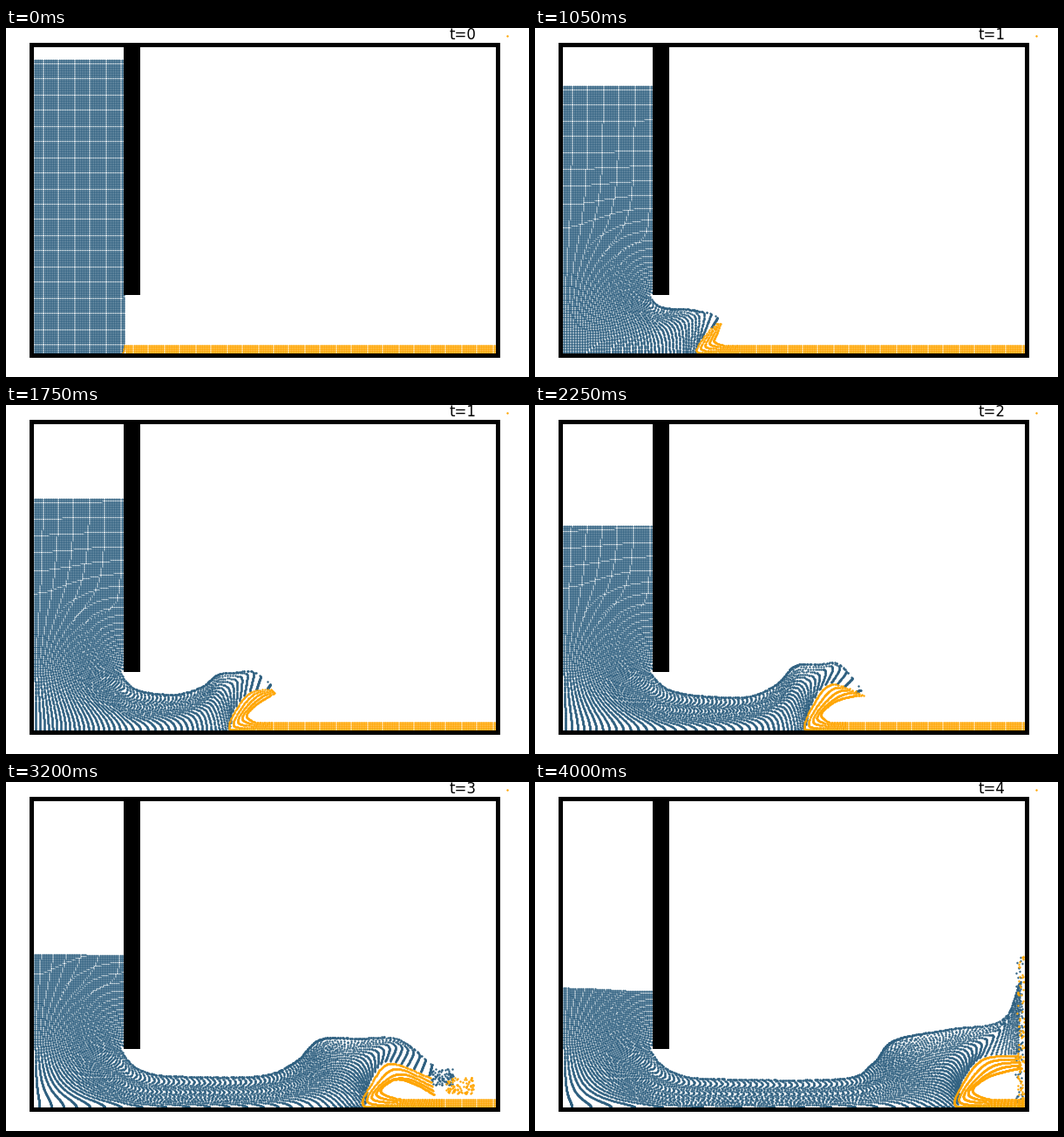
These frames come from a looping animation (600x400 px, 4.05 s). A matplotlib script:

```python
import numpy as np
import matplotlib.pyplot as plt
from matplotlib.animation import FuncAnimation
from matplotlib.patches import Rectangle

FRAMES, MS = 81, 50
LEFT, RIGHT, TOP, FLOOR = 32, 562, 22, 373
W, GAP = 103, 67            # reservoir width, gate opening
LIP = 4                     # the outflow starts this far before the gate
EXIT = LEFT + W - LIP
GATE = FLOOR - GAP
STEP = 2.118                # particle spacing
BED = 11                    # depth of the orange layer
BLUE, ORANGE = "#2f6080", "#ffa500"


def spline(q, x, y, rest=False):
    """Smooth curve through y(x); with rest it starts at zero speed."""
    q = np.asarray(q, float)
    x, y = np.asarray(x, float), np.asarray(y, float)
    m = np.gradient(y, x, axis=0)
    if rest:
        m[0] = 0
    i = np.clip(np.searchsorted(x, q, side="right") - 1, 0, len(x) - 2)
    col = (len(q),) + (1,) * (y.ndim - 1)
    h = (x[i + 1] - x[i]).reshape(col)
    p = ((q - x[i]) / (x[i + 1] - x[i])).reshape(col)
    return ((1 + 2 * p) * (1 - p) ** 2 * y[i] + p * (1 - p) ** 2 * h * m[i]
            + p * p * (3 - 2 * p) * y[i + 1] + p * p * (p - 1) * h * m[i + 1])


times = np.arange(FRAMES) * MS / 1000


def track(*values):
    return spline(times, (0, 0.7, 1.05, 1.75, 2.25, 3.2, 3.65, 4), values, True)


volume = W * track(0, 14, 30, 71, 102, 161, 184.5, 201)
reach = track(139, 205, 235, 305, 356, 500, 558, 561)    # end of moved bed
foot = track(133.7, 156, 184, 254, 307, 408, 451, 480)
tip_x = track(135, 171, 212, 308, 380, 490, 546, 557)
tip_y = track(306, 348, 335, 324, 335, 325, 318, 228)
dip_x = track(132.3, 146, 158, 175, 200, 190, 196, 200)
dip_y = track(306, 318, 322, 331, 334, 337, 339, 340)
flat_x = track(132.8, 150, 170, 200, 245, 290, 324, 350)
back_x = track(133.7, 157, 190, 243, 298, 360, 390, 412)
back_y = track(306, 325, 325, 309, 299, 295, 296, 296)
brow_x = track(134.6, 165, 207, 284, 350, 450, 498, 535)
brow_y = track(306, 344, 330, 306, 298, 295, 285, 273)
rise = track(0, 18, 25, 44, 54, 53, 55, 57)              # height of the arch
edge_y = track(373, 348, 337, 325, 332, 337, 330, 312)
curl_y = track(362, 348, 338, 330, 333, 362, 362, 330)


def mix(a, b, f):
    return a + (b - a) * f


def outlines(k):
    """Water surface, blue/orange interface and air side of the curl."""
    d = dip_y[k]
    surface = np.array([
        (EXIT, GATE),
        (mix(EXIT, dip_x[k], 0.18), mix(GATE, d, 0.5)),
        (mix(EXIT, dip_x[k], 0.46), mix(GATE, d, 0.83)),
        (dip_x[k], d),
        (flat_x[k], d),
        (mix(flat_x[k], back_x[k], 0.6), mix(d, back_y[k], 0.4)),
        (back_x[k], back_y[k]),
        (mix(back_x[k], brow_x[k], 0.5), mix(back_y[k], brow_y[k], 0.5) - 1),
        (brow_x[k], brow_y[k]),
        (tip_x[k], tip_y[k])])
    r = rise[k]
    edge = np.array([
        (foot[k], FLOOR),
        (foot[k] + 0.15 * r, FLOOR - 0.5 * r),
        (foot[k] + 0.55 * r, FLOOR - r),
        (tip_x[k] - 3 * min(1, r / 18), edge_y[k])])
    end = min(reach[k], RIGHT - 1)
    x = foot[k] + min((end - foot[k]) / 2, 25)
    y = FLOOR - BED - 0.2 * r
    roof = y - 0.22 * r
    lip = tip_x[k] + min(2, r / 9)
    curl = np.array([
        (lip, curl_y[k]),
        (mix(x, lip, 0.72), mix(roof, curl_y[k], 0.5)),
        (mix(x, lip, 0.32), roof),
        (x, y),
        (mix(x, end, 0.3), FLOOR - BED),
        (end, FLOOR - BED)])
    return surface, edge, curl, end


def ribbon(lo, hi, along, across, n=200):
    """Place particles between two curves, evenly by area along them."""
    i, c = np.arange(n), np.arange(len(lo))
    u = np.linspace(0, len(lo) - 1, n)
    lo, hi = spline(u, c, lo), spline(u, c, hi)
    d, e = hi[1:] - lo[:-1], hi[:-1] - lo[1:]
    area = 0.5 * np.abs(d[:, 0] * e[:, 1] - d[:, 1] * e[:, 0]) + 1e-6
    total = np.append(0, np.cumsum(area))
    pos = np.interp(along * total[-1], total, i)
    return np.column_stack([
        mix(np.interp(pos, i, lo[:, j]), np.interp(pos, i, hi[:, j]), across)
        for j in (0, 1)])


SINKS = -np.cosh(np.pi * (np.arange(20) + 0.5) / 20 * GAP / W)


def pull(z):
    """Potential flow in the reservoir towards the gate, per unit of volume."""
    zeta = np.cos(np.pi * z / W)
    total = (1 / (zeta[:, None] - SINKS)).sum(axis=1)
    return np.conj(np.sin(np.pi * z / W) * total) / (W * len(SINKS))


def keep_in(z):
    return np.clip(z.real, 0.3, W - 0.3) + 1j * np.maximum(z.imag, 0.3)


def grid(x, y):
    a, b = np.meshgrid(x, y)
    return a.ravel(), b.ravel()


def spray(k, offsets, shift, limit, mid, drift, size, wide):
    """Droplets thrown ahead of the tip, then up the right wall."""
    g = (times[k] - 2.7) / 1.3
    if g < 0:
        return np.empty((0, 2))
    x = min(tip_x[k] + shift, limit) + offsets[:, 0] * (4 + wide * (1 - g))
    y = mid + drift * g ** 3 + offsets[:, 1] * (5 + size * g ** 3)
    return np.column_stack([np.clip(x, LEFT, RIGHT - 1), y])


def simulate():
    rng = np.random.default_rng(4)
    drops_b, drops_o = rng.uniform(-1, 1, (2, 90, 2))

    gx, gy = grid(np.arange(1, W, STEP), np.arange(1, 337, STEP))
    z = gx + 1j * gy
    inside = np.ones(len(z), bool)
    left_at, level = np.zeros(len(z)), np.zeros(len(z))
    bx, by = grid(np.arange(136, RIGHT, STEP), 1 + STEP * np.arange(5))

    def release(v):
        go = inside & (z.real > W - LIP) & (z.imag < GAP + 1)
        left_at[go] = v - (z.real[go] - (W - LIP)) * GAP
        level[go] = np.clip(z.imag[go] / GAP, 0, 1)
        inside[go] = False

    release(0)
    frames, sub = [], 4
    for k in range(FRAMES):
        if k:
            dv = (volume[k] - volume[k - 1]) / sub
            for j in range(sub):
                p = z[inside]
                half = keep_in(p + pull(p) * dv / 2)
                z[inside] = keep_in(p + pull(half) * dv)
                release(volume[k - 1] + (j + 1) * dv)

        surface, edge, curl, end = outlines(k)
        floor_x = np.append(surface[:5, 0], (flat_x[k] + foot[k]) / 2)
        bottom = np.vstack([np.c_[floor_x, np.full(6, FLOOR)], edge])
        out = ~inside
        along = (volume[k] - left_at[out]) / (volume[k] + LIP * GAP)
        blue = np.vstack([
            np.c_[LEFT + z.real[inside], FLOOR - z.imag[inside]],
            ribbon(bottom, surface, along, level[out]),
            spray(k, drops_b, 10, 555, tip_y[k] + 10, 45, 85, 14)])

        moved = bx < end
        outer = np.vstack([edge[::-1], [((foot[k] + end) / 2, FLOOR),
                                        (end, FLOOR)]])
        along = 1 - (end - bx[moved]) / (end - 135)
        orange = np.vstack([
            np.c_[bx[~moved], FLOOR - by[~moved]],
            ribbon(outer, curl, along, by[moved] / BED),
            spray(k, drops_o, 30, 557, 352, -67, 80, 20),
            [(574.5, 8.5)]])
        for p in (blue, orange):
            p[:, 1] = np.minimum(p[:, 1], FLOOR - 1)
        frames.append((blue, orange))
    return frames


STATES = simulate()

fig = plt.figure(figsize=(6, 4), dpi=100, facecolor="white")
ax = fig.add_axes([0, 0, 1, 1])
ax.set(xlim=(0, 600), ylim=(400, 0))
ax.axis("off")

dots = dict(ls="", marker="o", ms=1.73, mew=0)
water, = ax.plot([], [], color=BLUE, zorder=2, **dots)
bed, = ax.plot([], [], color=ORANGE, zorder=3, **dots)


def block(x0, y0, x1, y1):
    ax.add_patch(Rectangle((x0, y0), x1 - x0, y1 - y0,
                           fc="black", lw=0, zorder=4))


WALL = 5
block(LEFT - WALL, TOP - WALL, RIGHT + WALL, TOP)
block(LEFT - WALL, FLOOR, RIGHT + WALL, FLOOR + WALL)
block(LEFT - WALL, TOP, LEFT, FLOOR)
block(RIGHT, TOP, RIGHT + WALL, FLOOR)
block(LEFT + W, TOP, LEFT + W + 19, GATE)
clock = ax.text(508.5, 13, "t=0", family="DejaVu Sans", size=12,
                ha="left", va="baseline", zorder=5)


def draw(i):
    blue, orange = STATES[i]
    water.set_data(blue[:, 0], blue[:, 1])
    bed.set_data(orange[:, 0], orange[:, 1])
    clock.set_text(f"t={i * MS // 1000}")
    return water, bed, clock


anim = FuncAnimation(fig, draw, frames=FRAMES, interval=MS,
                     repeat=True, repeat_delay=0)
plt.show()
```
